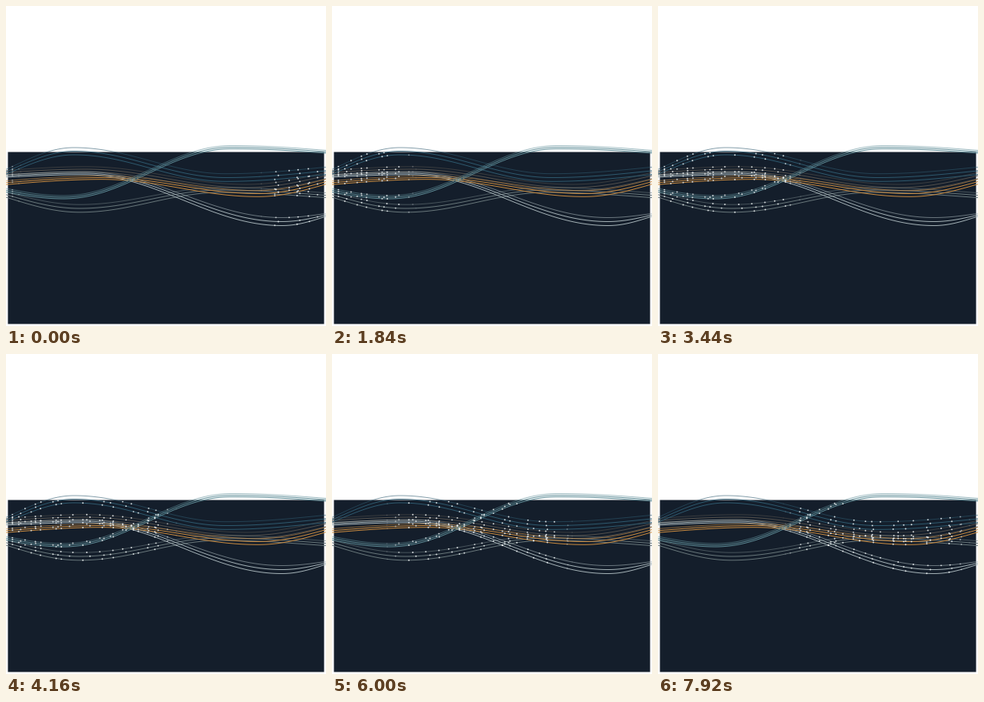
Animation, 400 px wide and 400 px high, one loop 8000 ms. Source, as an HTML page with a canvas:

```html
<!DOCTYPE html>
<html>
<head>
<meta charset="utf-8">
<style>
html, body { margin: 0; width: 100%; height: 100%; overflow: hidden; background: #fff; }
canvas { display: block; width: 400px; height: 400px; }
</style>
</head>
<body>
<canvas id="stage" width="400" height="400"></canvas>
<script>
const ctx = document.getElementById('stage').getContext('2d');
const LOOP = 8000, STEP = 80, TOP = 182.5;
const SPEED = 0.047, PERIOD = 533, LENGTH = 238, FADE = 24;

// crests and troughs of each ribbon: x, y, distance to the outer strands
const ribbons = [
  { color: '#55524d', keys: [[-95, 212, 2], [100, 204, 3.2], [300, 227, 4], [500, 197, 4]] },
  { color: '#2f5b70', keys: [[-60, 222, 2], [85, 181.5, 4.5], [275, 214.5, 4.8], [500, 200, 4.5]] },
  { color: '#6b7a7d', keys: [[-80, 222, 2], [92, 253, 4.8], [270, 230, 3], [500, 241, 3]] },
  { color: '#a9b7bb', keys: [[-85, 215, 1.5], [98, 209, 1.8], [345, 269.5, 5], [450, 254, -1]] },
  { color: '#d08f41', keys: [[-105, 226, 2.5], [120, 214.5, 2.2], [315, 234.5, 3.8], [480, 206, 2.5]] },
  { color: '#608f99', keys: [[-75, 221, 2.5], [72, 239, 2], [282, 176.5, 2], [520, 188, 1.5]] }
];

let seed = 11;
function random() {
  seed = seed * 16807 % 2147483647;
  return seed / 2147483647;
}

// dot positions shared by matching strands of all ribbons
const beads = [0, 1, 2].map(() => {
  const xs = [];
  for (let x = 8 + 10 * random(); x < 398; x += 6 + 22 * random()) xs.push(x);
  return xs;
});

const clamp = v => Math.max(0, Math.min(1, v));

function height({ keys }, strand, x) {
  const i = keys.findIndex(k => k[0] > x);
  const a = keys[i - 1], b = keys[i];
  const ease = (1 - Math.cos(Math.PI * (x - a[0]) / (b[0] - a[0]))) / 2;
  const mix = n => a[n] + (b[n] - a[n]) * ease;
  return mix(1) + (strand - 1) * mix(2);
}

function drawStrand(r, strand) {
  ctx.strokeStyle = r.color;
  ctx.globalAlpha = strand ? 1 : 0.6;
  ctx.beginPath();
  for (let x = 0; x <= 400; x += 2) ctx.lineTo(x, height(r, strand, x));
  ctx.stroke();
}

function drawBeads(r, strand, head) {
  for (const x of beads[strand]) {
    const behind = (head - x + PERIOD) % PERIOD, y = height(r, strand, x);
    if (y < TOP || behind > LENGTH) continue;
    ctx.globalAlpha = 0.85 * clamp(behind / FADE) * clamp((LENGTH - behind) / FADE);
    ctx.beginPath();
    ctx.arc(x, y, 0.95, 0, 2 * Math.PI);
    ctx.fill();
  }
}

function eachStrand(draw) {
  for (const r of ribbons) for (let s = 0; s < 3; s++) draw(r, s);
}

function frame(now) {
  const t = Math.floor(now % LOOP / STEP) * STEP;
  ctx.globalAlpha = 1;
  ctx.fillStyle = '#fff';
  ctx.fillRect(0, 0, 400, 400);
  ctx.fillStyle = '#141e2b';
  ctx.fillRect(2.4, TOP, 395.2, 215);
  ctx.lineWidth = 0.95;
  eachStrand(drawStrand);
  ctx.fillStyle = '#eef3f5';
  eachStrand((r, s) => drawBeads(r, s, 21 + SPEED * t));
  requestAnimationFrame(frame);
}
requestAnimationFrame(frame);
</script>
</body>
</html>
```
